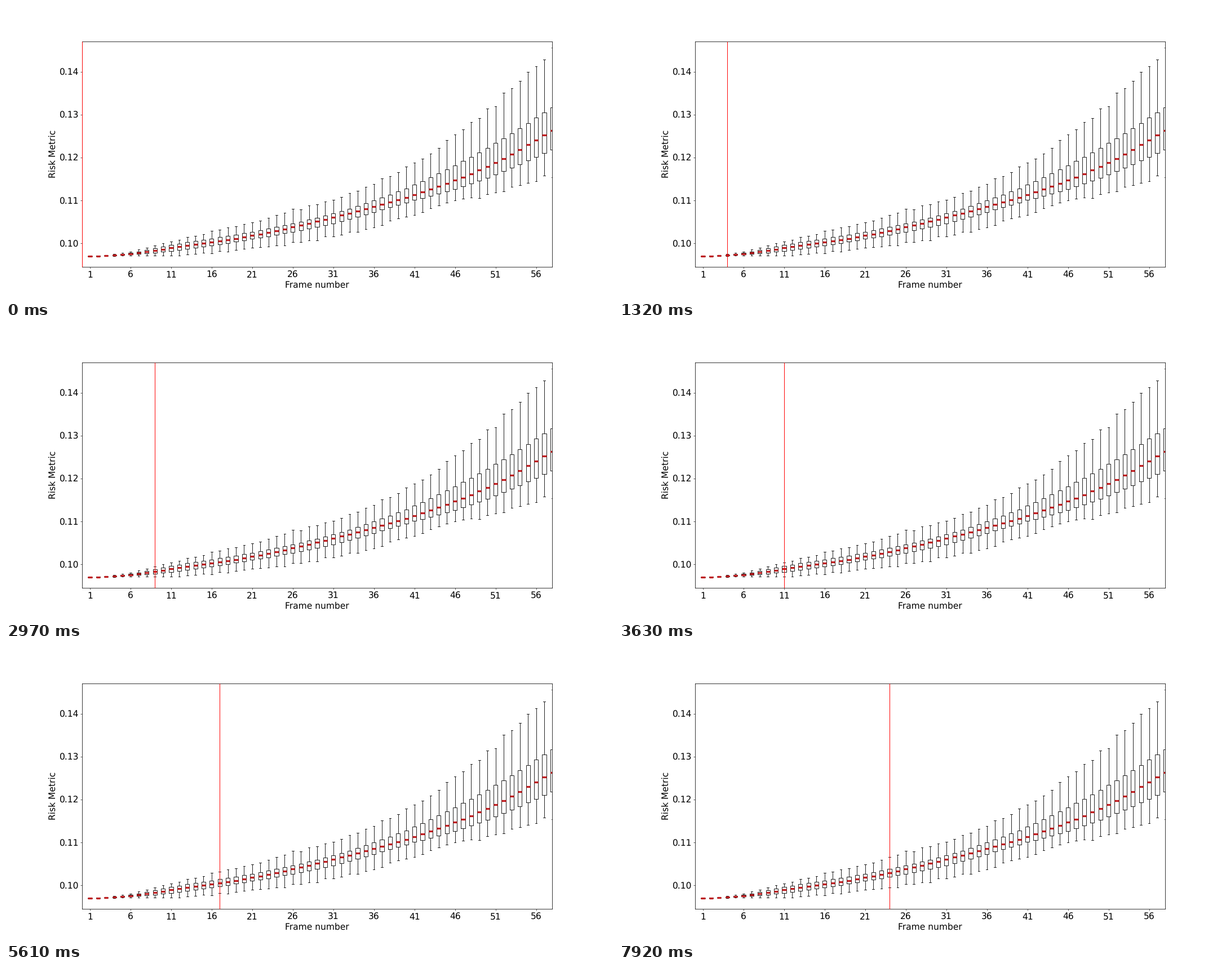
Recreate the animation shown at these times as a matplotlib script. Size 1077 by 520 pixels, loop 8 s.

```python
import numpy as np
import matplotlib.pyplot as plt
from matplotlib.animation import FuncAnimation
from matplotlib.collections import LineCollection

WIDTH, HEIGHT, DPI = 1077, 520, 56.1
LOOP_MS, TICK_MS, STEP_MS = 8000, 40, 330
COUNT = 58
BOX, CAP = 0.25, 0.125  # half widths

plt.rcParams.update({
    "font.family": "DejaVu Sans",
    "font.size": 20,
    "text.hinting": "none",
    "axes.linewidth": 1.0,
})

rng = np.random.default_rng(4)
pos = np.arange(1, COUNT + 1)
KEYS = np.array([1, 4, 11, 21, 31, 41, 46, 51, 58])


def curve(*values):
    """Smooth cubic through values (in ten-thousandths) at the key boxes."""
    y = np.array(values) * 1e-4
    slope = np.gradient(y, KEYS)
    i = np.clip(np.searchsorted(KEYS, pos, side="right") - 1, 0, len(KEYS) - 2)
    h = KEYS[i + 1] - KEYS[i]
    t = (pos - KEYS[i]) / h
    ease = t * t * (3 - 2 * t)
    bend = t * (1 - t) * ((1 - t) * slope[i] - t * slope[i + 1])
    return y[i] + ease * (y[i + 1] - y[i]) + h * bend


def jitter(whisker, edge, amount=0.06):
    """Vary the whisker length a little from box to box."""
    return whisker + (whisker - edge) * rng.normal(0, amount, COUNT)


median = curve(970.5, 972.5, 989.5, 1018.5, 1061, 1113.5, 1147, 1188, 1263)
q1 = curve(970.5, 972, 982.5, 1010.5, 1047, 1101, 1127, 1160.5, 1218.5)
q3 = curve(970.5, 973, 996.5, 1027.5, 1070, 1136.5, 1182, 1233.5, 1317)
low = jitter(curve(970.5, 971, 972.5, 989, 1016, 1068, 1099, 1118, 1159.5), q1)
high = jitter(curve(970.5, 975, 1005, 1051, 1105, 1186, 1250, 1327, 1447), q3)

# The tiny margin keeps the canvas size from rounding down.
fig, ax = plt.subplots(
    figsize=((WIDTH + 1e-4) / DPI, (HEIGHT + 1e-4) / DPI), dpi=DPI)
fig.subplots_adjust(left=0.125, right=0.9, bottom=0.11, top=0.879)
ax.set_xlim(0, COUNT)
ax.set_ylim(0.09458, 0.14703)
ax.set_xticks(range(1, COUNT, 5))
ax.set_yticks([0.10, 0.11, 0.12, 0.13, 0.14])
ax.tick_params(axis="x", pad=4.9)
ax.set_xlabel("Frame number")
ax.set_ylabel("Risk Metric")


def add_lines(segments, color="black", width=1.1, cap="projecting"):
    ax.add_collection(LineCollection(
        segments, colors=color, linewidths=width, capstyle=cap,
        joinstyle="miter"), autolim=False)


def bars(values, half):
    """Horizontal strokes centred on each box position."""
    return [[(x - half, y), (x + half, y)] for x, y in zip(pos, values)]


def stems(start, end):
    return [[(x, a), (x, b)] for x, a, b in zip(pos, start, end)]


add_lines([[(x - BOX, a), (x + BOX, a), (x + BOX, b), (x - BOX, b),
            (x - BOX, a)] for x, a, b in zip(pos, q1, q3)])
add_lines(stems(q1, low) + stems(q3, high), cap="butt")
add_lines(bars(low, CAP) + bars(high, CAP))
add_lines(bars(median, BOX), "#c01c1f", 4.2, "butt")

cursor = ax.axvline(0, color="red", lw=1.25, zorder=3, clip_on=False,
                    solid_capstyle="butt")


def update(i):
    # Steps fall on multiples of 10 ms; take the last one within this tick.
    step = (i * TICK_MS + TICK_MS - 10) // STEP_MS
    cursor.set_xdata([step, step])
    return (cursor,)


anim = FuncAnimation(fig, update, frames=LOOP_MS // TICK_MS,
                     interval=TICK_MS, repeat=True, repeat_delay=0)
plt.show()
```
